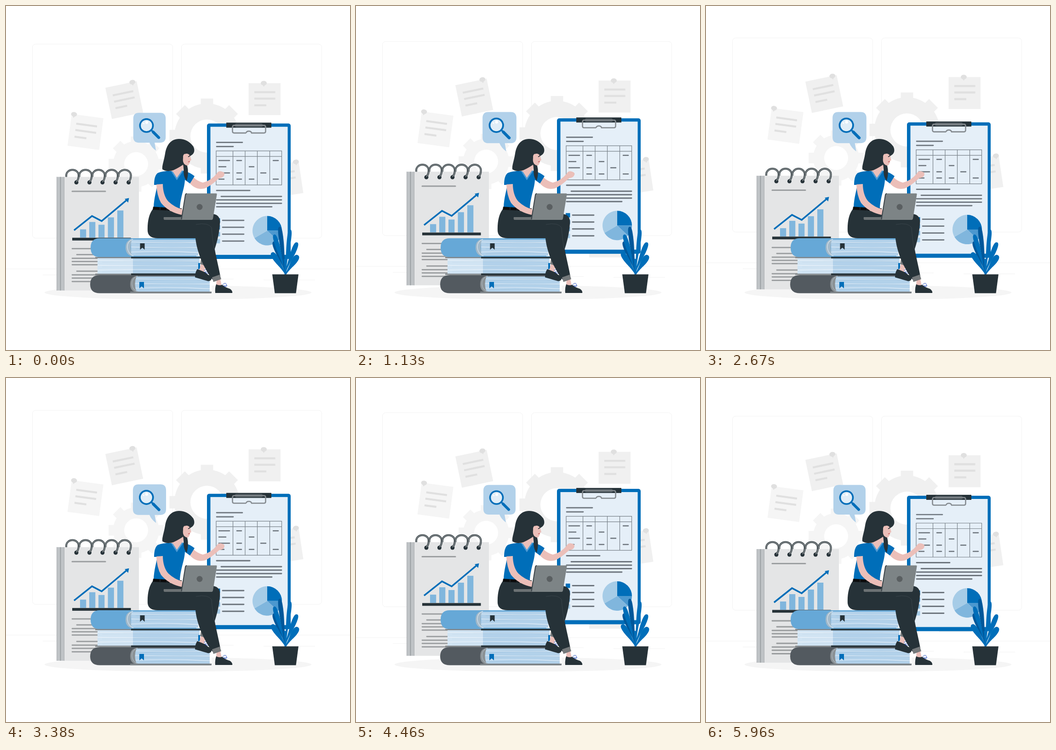
These frames come from a looping animation (748 by 748 pixels, 6 s). An HTML page:

```html
<!DOCTYPE html>
<html lang="en">
<head>
<meta charset="utf-8">
<title>Reviewing reports</title>
<style>
  html, body { margin: 0; width: 100%; height: 100%; overflow: hidden; background: #fff; }
  svg { display: block; width: 100vw; height: 100vh; }
</style>
</head>
<body>
<svg viewBox="0 0 748 748">
  <g id="room"></g>
  <ellipse cx="374" cy="623" rx="290" ry="15.5" fill="#f5f5f5"/>
  <g id="bubble">
    <path d="M289 232.500H335Q347 232.500 347 245V285Q347 297 335 297H323L326 314Q316 307 312 297H289Q277 297 277 285V245Q277 232.500 289 232.500Z" fill="#b2d1ea"/>
    <path d="M315 269L320 274" stroke="#006eb9" stroke-width="3.5"/>
    <path d="M320 274L332 286" stroke="#006eb9" stroke-width="6" stroke-linecap="round"/>
    <circle cx="305.5" cy="260" r="14" fill="#e0edf7" stroke="#006eb9" stroke-width="3.600"/>
    <circle cx="306" cy="253.500" r="3" fill="#fff"/><circle cx="299.500" cy="255.500" r="1.500" fill="#fff"/>
  </g>
  <g id="notebook"></g>
  <g id="clipboard"></g>
  <g id="books"></g>
  <g id="plant"></g>
  <g id="woman">
    <path d="M400 455L447 452C460 452 467 460 465 474C463 504 454 530 444 556L424 552Q430 520 420 480Z" fill="#263238"/>
    <path d="M424 560L434 563L431 578L420 575Z" fill="#ebbfb9"/>
    <path d="M424 551L436 555L434 565L422 561Z" fill="#75797b"/>
    <path d="M416 572Q426 576 433 579Q440 585 447 590Q448 597 440 598.500L411 590Q411 579 416 572Z" fill="#263238"/>
    <path d="M430 575q8 -4 9 0t-7 3q7 6 9 2" fill="none" stroke="#3159c6" stroke-width="1"/>
    <path d="M458 595L466 594L469 608Q463 612 457 607Z" fill="#ebbfb9"/>
    <path d="M457 605Q464 609 470 606Q476 612 487 615Q493 619 492 624H455Q454 614 457 605Z" fill="#263238"/>
    <path d="M471 606q6 -6 8 -1t-6 3q5 5 8 -1" fill="none" stroke="#3159c6" stroke-width="1"/>
    <path d="M319 442L382 444L397 456L428 465Q447 470 449 491C451 525 460 555 466 587L449 595C430 570 415 535 412 505H330Q310 505 308 490C307 470 311 452 319 442Z" fill="#263238"/>
    <path d="M413 475Q440 470 447 482Q449 510 453 530" fill="none" stroke="#39444a"/>
    <path d="M448 590L465 584L468 594L451 600Z" fill="#75797b"/>
    <path d="M400 386C412 399 424 399 434 396C446 390 456 381 464 374C473 374 477 367 474 362Q464 356 459 363C453 372 441 381 428 384Q416 381 406 371Z" fill="#ebbfb9"/>
    <path d="M384 318H402L401 328L403 335L400 337Q400 347 391 348L385 354L384 364L372 378L358 359L374 346Z" fill="#ebbfb9"/>
    <path d="M330 363Q344 358 360 359L372 377L384 358Q399 361 410 370L400 386L389 378C388 399 379 414 378 441L321 438C322 416 327 402 329 389H322Q322 369 330 363Z" fill="#006eb9"/>
    <path d="M361 360L371.500 376L384 358" fill="none" stroke="#4f9bd4" stroke-width="3"/>
    <path d="M320 436.500L382 440V446L319 443Z" fill="#0b0c0d"/>
    <path d="M335 438V443M350 439V444" stroke="#333d42"/>
    <path d="M357 440H366V445H357Z" fill="none" stroke="#fff" stroke-width="1.200"/>
    <path d="M327 388L341 387C341 402 345 416 353 425Q367 438 383 442L386 455Q355 450 337 428Q328 412 327 388Z" fill="#ebbfb9"/>
    <path d="M376 289C358 289 349 303 346 321C343 339 339 347 340 355Q350 362 364 357Q377 351 385 345C388 356 383 368 393 380Q398 362 394 347Q387 346 385 338C384 328 387 322 392 321Q398 321 400 326C411 322 411 312 407 305Q395 289 376 289Z" fill="#263238"/>
    <ellipse cx="389" cy="328" rx="4" ry="6.500" fill="#ebbfb9"/>
    <path d="M396 328L401 325" stroke="#263238" stroke-width="1.500"/>
    <path d="M396 339l4 -1" stroke="#c95c5c" stroke-width="1.500"/>
    <path d="M345 459H384V465H345Q342 465 343 459Z" fill="#6c7274"/>
    <path d="M393 407.500H457Q459 407.500 458.500 410L450 462Q449.500 465 447 465H383Q380.500 465 381 462L390 410Q390.500 407.500 393 407.500Z" fill="#7d8486"/>
    <path d="M393 408Q390.500 408 390 411L381.500 464" fill="none" stroke="#3b4449" stroke-width="2"/>
    <circle cx="421" cy="437" r="6.500" fill="#5a5f61"/>
  </g>
</svg>
<script>
const BLUE = '#006eb9', DARK = '#263238', LOOP = 6000, LIFT = 14.96, LEAD = 40;
const $ = id => document.getElementById(id);
const fill = (d, color) => `<path d="${d}" fill="${color}"/>`;
const rect = (x, y, w, h, color, r = 0) =>
  `<rect x="${x}" y="${y}" width="${w}" height="${h}" rx="${r}" fill="${color}"/>`;
const stroke = (d, color, width, cap = 'butt') =>
  `<path d="${d}" fill="none" stroke="${color}" stroke-width="${width}" stroke-linecap="${cap}"/>`;
const rows = (ys, x1, x2) => ys.map(y => `M${x1} ${y}H${x2}`).join('');

function gear(cx, cy, body, outer, half, hole, color) {
  let teeth = '';
  for (let a = 0; a < 360; a += 45)
    teeth += `<rect x="${cx - half}" y="${cy - outer}" width="${half * 2}" height="${outer}" fill="${color}" transform="rotate(${a} ${cx} ${cy})"/>`;
  return teeth + `<circle cx="${cx}" cy="${cy}" r="${body}" fill="${color}"/><circle cx="${cx}" cy="${cy}" r="${hole}" fill="#fff"/>`;
}

// Square sticky note, placed by its top-left corner and tilt
function note(x, y, tilt, pinX, color) {
  return `<g transform="translate(${x} ${y}) rotate(${tilt})">` + rect(0, 0, 69.5, 69.5, color) +
    stroke('M12.500 19.500H58M12.500 33.500H58M12.500 48H38.500', '#e0e0e0', 4.3) +
    `<ellipse cx="${pinX}" cy="0" rx="6.500" ry="5" fill="#e0e0e0"/>` +
    fill(`M${pinX - 3} 3H${pinX + 3}L${pinX} 8Z`, '#e0e0e0') + '</g>';
}

function room() {
  const panes = [57.5, 381.5].map(x =>
    `<rect x="${x}" y="83" width="305" height="422" rx="7" fill="none" stroke="#f3f3f3"/>`).join('');
  return panes +
    stroke('M0 572H748M80 585H130M448 594H495M560 596H672', '#efefef', 0.8) +
    rect(507, 540, 70, 12.5, '#f0f0f0') +
    gear(283, 344, 50, 60, 11.5, 26, '#f5f5f5') +
    gear(437, 283, 71, 81.5, 13.5, 36, '#f0f0f0') +
    note(143, 235, 7.7, 5, '#f5f5f5') + note(216, 178, -11.8, 60, '#f0f0f0') +
    note(527.5, 168, 0, 33, '#f0f0f0') + note(567.5, 348.5, -8.5, 63.5, '#f0f0f0');
}

function notebook() {
  const bars = [[161, 486], [181, 470], [201, 476], [221.5, 460], [242, 445]];
  let s = rect(110, 372, 17, 247, '#bfc3c6') + rect(127, 372, 162, 247, '#e4e5e6') +
    stroke('M118.500 372V619', '#92979a', 1.5) + stroke('M126.500 372V619M110.500 372V619', '#a7abae', 1);
  for (let i = 0; i < 5; i++) {
    const x = 131 + i * 28.4;
    const ring = `M${x} 372V369A13.500 12.300 0 0 1 ${x + 27} 369Q${x + 27} 378 ${x + 22} 383`;
    s += `<circle cx="${x + 22}" cy="384" r="4.500" fill="${DARK}"/>` +
      stroke(ring, DARK, 4) + stroke(ring, '#858b8d', 2);
  }
  s += stroke('M144 403.500H216', '#9c9fa1', 3, 'round');
  for (const [x, top] of bars) s += rect(x, top, 13.3, 504 - top, '#80b6dd');
  return s + rect(144, 504.300, 127.500, 6, DARK) +
    stroke('M148 488L187 457L208 468L264 421', BLUE, 3.6) + fill('M267.500 418L258 420L265.500 428Z', BLUE) +
    stroke(rows([528, 549, 556, 563, 585, 592, 599.5], 144, 270) + rows([541, 577], 154, 270), '#999c9e', 2.8, 'round');
}

function pie(cx, cy, r) {
  const at = deg => {
    const a = deg * Math.PI / 180;
    return `${cx + r * Math.sin(a)} ${cy - r * Math.cos(a)}`;
  };
  const slice = (from, to, color) => fill(`M${cx} ${cy}L${at(from)}A${r} ${r} 0 0 1 ${at(to)}Z`, color);
  return slice(0, 90, BLUE) + slice(90, 133, '#4c98cf') + slice(133, 240, '#80b6dd') + slice(240, 360, '#a6cce7');
}

function clipboard() {
  const cells = [[462, 487, [336.5, 363.5]], [462, 479, [350]], [462, 475, [377]],
    [501, 513, [336.5, 363.5, 377]], [528, 540, [350, 377]], [553, 566, [363.5]], [580, 593, [336.5, 377]]];
  const keys = [BLUE, '#4c98cf', '#80b6dd', '#a6cce7'];
  return rect(437, 256, 182, 294.500, BLUE, 5) + rect(444.500, 263, 168, 278.500, '#e5eff8') +
    rect(479, 254, 98, 11, DARK) + rect(498, 256, 60, 8, '#4b555b', 3) +
    stroke('M522 276.500H496Q492.500 276.500 492.500 273V264Q492.500 260 496 260H561Q564.500 260 564.500 264V273Q564.500 276.500 561 276.500H534Q533 272.500 528 272.500T522 276.500', '#858b90', 2.6) +
    stroke('M458 297H514M458 306H494', '#6e767e', 2.7, 'round') +
    stroke('M457 315.500H599.500V389.500H457ZM457 327.500H599.500M493.500 315.500V389.500M520 315.500V389.500M546.500 315.500V389.500M573.500 315.500V389.500', '#79828a', 1.2) +
    stroke(cells.map(([a, b, ys]) => rows(ys, a + 1, b - 1)).join(''), '#6e767e', 2.5, 'round') +
    stroke('M458 401.500H530M468 414.500H599' + rows([422, 429.5], 458, 599) + 'M458 437H578' +
      rows([466.5, 481.5, 496.5, 511.5], 471, 517), '#6e767e', 2.9, 'round') +
    keys.map((c, i) => rect(456, 462 + i * 15, 9.5, 9.5, c)).join('') + pie(568, 489, 32);
}

// Fanned page edges: soft pale wedges over the page block
function pages(x, y, w, h) {
  let s = rect(x, y, w, h, '#b2d1ea');
  for (let i = 0; i < 3; i++) {
    const top = y + 4 + i * h / 3.2, bend = i < 2 ? 3 : -3;
    s += fill(`M${x} ${top}Q${x + w / 2} ${top + bend} ${x + w} ${top + 1}V${top + 4}Q${x + w / 2} ${top + bend + 1} ${x} ${top + 2}Z`, '#cfe2f2');
    s += stroke(`M${x + 10} ${top + 5}Q${x + w / 2} ${top + 2} ${x + w} ${top + 4}`, '#98bcd9', 0.6);
  }
  return s;
}
const ribbon = (x, y, color) => fill(`M${x} ${y}h10v14l-5 -4.500l-5 4.500z`, color);

function books() {
  return fill('M204 505H414V546H204Q184 546 184 525.500T204 505Z', '#66a8d7') + pages(272, 508, 146, 35) +
    fill('M274 507Q260 509 260 525T274 544Q268 526 274 507Z', '#a2b9ca') +
    stroke('M276 507Q263 512 264 525T277 544', '#dbe6ef', 1.2) + ribbon(291.5, 516, DARK) +
    rect(200, 544, 228, 2.500, '#66a8d7') +
    pages(199, 548, 222, 34) + `<path d="M199 548H276V582H199Z" fill="#fff" opacity=".4"/>` +
    rect(194, 545.800, 78, 2.500, '#7d8387') + rect(272, 545.300, 156, 3.500, DARK) +
    rect(418, 559, 4, 13, BLUE) +
    fill('M204 585H446V624.500H204Q183 624.500 183 605T204 585Z', '#535a60') + pages(280, 588, 163, 33) +
    rect(443, 588, 4, 33, '#fff') + rect(270, 621, 177, 3.500, '#7d8387') +
    rect(194, 582, 78, 2.500, '#7d8387') + rect(272, 581.500, 160, 3.500, DARK) +
    fill('M284 587Q270 589 270 605T284 622Q277 605 284 587Z', '#8b9194') +
    stroke('M286 587Q273 592 274 605T287 621', '#a9b5be', 1.2) + ribbon(290, 600, BLUE);
}

// Leaf with a slim stalk that swells into a rounded tip
function leaf(bx, by, tx, ty, width, color) {
  const dx = tx - bx, dy = ty - by, len = Math.hypot(dx, dy);
  const p = (u, v) => `${bx + dx * u - dy / len * v} ${by + dy * u + dx / len * v}`;
  return fill(`M${p(0, 1.5)}C${p(0.4, 2)} ${p(0.5, width)} ${p(0.78, width)}C${p(0.96, width)} ${p(1, 3)} ${p(1, 0)}C${p(1, -3)} ${p(0.96, -width)} ${p(0.78, -width)}C${p(0.5, -width)} ${p(0.4, -2)} ${p(0, -1.5)}Z`, color);
}

function plant() {
  const deep = '#00579a';
  return leaf(607, 575, 582, 512, 5.5, deep) + leaf(608, 570, 618, 486, 4.5, BLUE) +
    leaf(608, 576, 633, 514, 5.5, BLUE) + leaf(608, 583, 635, 542, 6.500, BLUE) +
    leaf(606, 572, 583, 497, 5, BLUE) + leaf(607, 578, 595, 480, 5, deep) +
    leaf(608, 582, 578, 536, 6, BLUE) +
    stroke('M607.500 585Q608 570 606 550', BLUE, 4) +
    fill('M579 583.500H636L630.500 624.500H584.500Z', DARK);
}

for (const draw of [room, notebook, clipboard, books, plant]) $(draw.name).innerHTML = draw();

// Pulse as [progress, scale] pairs
const PULSE = [[0, 1], [0.1, 1.1], [0.3, 1], [0.4, 1], [0.5, 1.1], [0.6, 1], [1, 1]];
function pulse(u) {
  const i = PULSE.findIndex(([at]) => at > u);
  const [u0, s0] = PULSE[i - 1], [u1, s1] = PULSE[i];
  return s0 + (s1 - s0) * (u - u0) / (u1 - u0);
}
const rise = (t, period) => -LIFT * (1 - Math.abs(1 - 2 * (t % period) / period));
const shift = (id, y) => $(id).setAttribute('transform', `translate(0 ${y})`);

function render(t) {
  shift('room', rise(t, LOOP));
  shift('notebook', rise(t, LOOP / 2));
  shift('clipboard', rise(t, LOOP / 2));
  $('bubble').setAttribute('transform', `translate(312 273) scale(${pulse(t / LOOP)}) translate(-312 -273)`);
}
function tick() {
  render((performance.now() + LEAD) % LOOP);
  requestAnimationFrame(tick);
}
tick();
</script>
</body>
</html>
```
